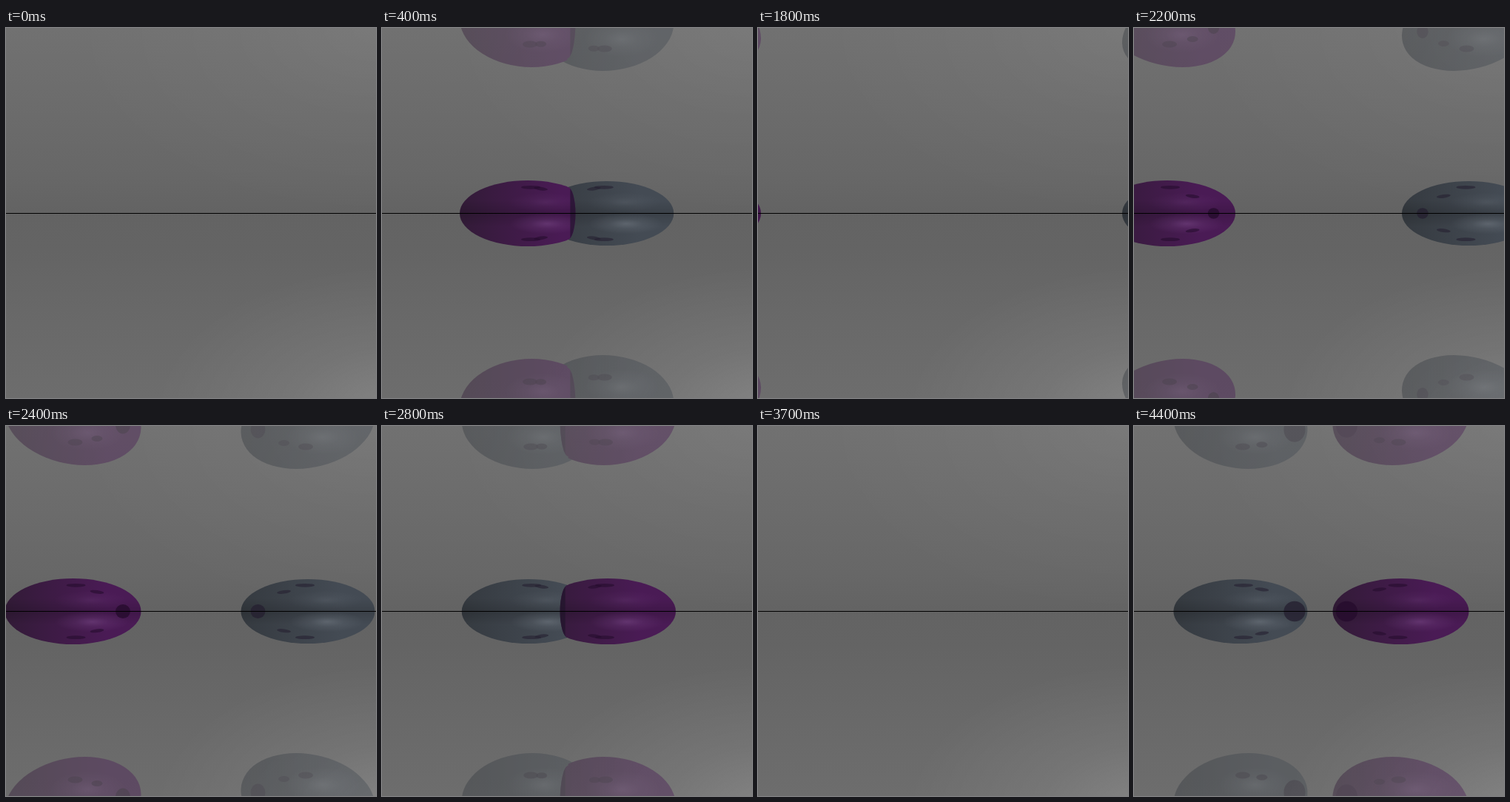
An HTML page with a canvas for the animation above (4.5 s loop, 500 px wide and 500 px high).

```html
<!DOCTYPE html>
<html>
<head>
<meta charset="utf-8">
<style>
html, body { margin: 0; width: 100%; height: 100%; overflow: hidden; background: #686868; }
canvas { display: block; width: 500px; height: 500px; }
</style>
</head>
<body>
<canvas id="stage" width="500" height="500"></canvas>
<script>
const STEP = 100, COUNT = 45, MID = 251, SIZE = 500;
const ctx = document.getElementById('stage').getContext('2d');

// The poses swing there and back, but play in alphabetical order: 0, 1, 10, 11 ...
const order = Array.from({ length: COUNT }, (_, i) => i).sort();

// Distance from the middle, by steps away from the crossing
const swing = [0, 54, 109.5, 160.5, 206, 248, 284, 314, 339, 358, 370, 374];

const purple = { rx: 92, ry: 44.5, mirrorY: -9, mirrorRy: 62,
  dark: '#321b37', light: '#4a1b55', spot: '#260c2d', shine: '130,80,145' };
const grey = { rx: 90.5, ry: 43.5, mirrorY: -3, mirrorRy: 61,
  dark: '#353a40', light: '#444b54', spot: '#262131', shine: '125,133,142' };

function layer(paint) {
  const c = document.createElement('canvas');
  c.width = c.height = SIZE;
  const g = c.getContext('2d');
  if (paint) paint(g);
  return g;
}

function glow(g, x, y, rx, ry, rgb, alpha) {
  g.save();
  g.translate(x, y);
  g.scale(rx, ry);
  const fill = g.createRadialGradient(0, 0, 0, 0, 0, 1);
  fill.addColorStop(0, `rgba(${rgb},${alpha})`);
  fill.addColorStop(0.45, `rgba(${rgb},${alpha * 0.38})`);
  fill.addColorStop(1, `rgba(${rgb},0)`);
  g.fillStyle = fill;
  g.fillRect(-1, -1, 2, 2);
  g.restore();
}

function oval(g, x, y, rx, ry, tilt = 0) {
  g.beginPath();
  g.ellipse(x, y, rx, ry, tilt, 0, 7);
  g.fill();
}

const room = layer(g => {
  const wall = g.createLinearGradient(0, 0, 0, SIZE);
  [[0, 113], [0.2, 108], [0.4, 103], [0.5, 99], [0.6, 100], [0.8, 105], [1, 109]]
    .forEach(([p, v]) => wall.addColorStop(p, `rgb(${v},${v},${v})`));
  g.fillStyle = wall;
  g.fillRect(0, 0, SIZE, SIZE);
  glow(g, 500, 0, 420, 260, '255,255,255', 0.06);
  glow(g, 530, 520, 330, 200, '255,255,255', 0.16);
}).canvas;

const mirror = layer();

// gap: distance between the centres, side: direction of the other ball
function ball(g, b, x, gap, side, mirrored) {
  const y = mirrored ? b.mirrorY : 250.5;
  const ry = mirrored ? b.mirrorRy : b.ry;
  const lean = mirrored ? (MID - x) * 0.1 : 0;
  g.save();
  g.translate(x, y);
  g.save();
  g.transform(1, 0, lean / ry, 1, 0, 0);
  g.beginPath();
  g.ellipse(0, 0, Math.sqrt(b.rx ** 2 - lean ** 2), ry, 0, 0, 7);
  g.restore();
  g.clip();

  const body = g.createLinearGradient(-b.rx, 0, b.rx, 0);
  body.addColorStop(0, b.dark);
  body.addColorStop(0.75, b.light);
  body.addColorStop(1, b.light);
  g.fillStyle = body;
  g.fillRect(-110, -80, 220, 160);

  if (mirrored) {
    glow(g, 20, 18, 50, 24, b.shine, 0.5);
  } else {
    const band = g.createLinearGradient(0, -18, 0, 18);
    band.addColorStop(0, 'rgba(0,0,0,0)');
    band.addColorStop(0.5, 'rgba(0,0,0,.14)');
    band.addColorStop(1, 'rgba(0,0,0,0)');
    g.fillStyle = band;
    g.fillRect(-110, -18, 220, 36);
    glow(g, 24, -15, 50, 13, b.shine, 0.2);
    glow(g, 26, 14, 50, 14, b.shine, 0.48);
  }

  const near = Math.max(gap, 60);
  g.fillStyle = b.spot;
  g.globalAlpha = 0.8;
  if (gap > 150) {
    const r = 3150 / near;
    oval(g, side * (58 + (490 - gap) * 0.055), mirrored ? 8 : 0, r, mirrored ? r * 1.15 : r * 0.95);
  }
  g.globalAlpha = 0.6;
  const ax = side * (40 - 2400 / near);
  if (mirrored) {
    oval(g, side * 3, 31, 10, 4.5);
    oval(g, ax, 33 - gap * 0.022, 7.5, 4);
  } else {
    for (const v of [-1, 1]) {
      oval(g, side * 4, v * 35.2, 13, 2.4);
      oval(g, ax, v * (37 - gap * 0.034), 9.5, 2.3, -v * side * 0.13);
    }
  }
  g.restore();
}

function pair(g, d, mirrored) {
  const px = MID + d, gx = MID - d * 0.978;
  const gap = Math.abs(px - gx), side = d < 0 ? 1 : -1;
  ball(g, grey, gx, gap, -side, mirrored);

  const depth = 16, reach = Math.hypot(gap, depth);
  const touching = reach < 2 * purple.rx;
  g.save();
  if (touching) {
    // The purple ball is a little nearer, so the seam bulges towards the grey one
    const seam = Math.sqrt(purple.rx ** 2 - reach ** 2 / 4);
    const mx = (px + gx) / 2, bulge = seam * depth / reach;
    const y = mirrored ? purple.mirrorY : 250.5;
    const h = seam * (mirrored ? purple.mirrorRy : purple.ry) / purple.rx;
    g.beginPath();
    g.rect(side < 0 ? mx : mx - SIZE, -100, SIZE, 700);
    g.ellipse(mx, y, bulge, h, 0, 0, Math.PI * 2);
    g.clip();
    ball(g, purple, px, gap, side, mirrored);
    if (gap > 60) {
      g.beginPath();
      g.ellipse(mx + side * 4, y, bulge - 3, h, 0, Math.PI / 2, Math.PI * 1.5, side > 0);
      g.fillStyle = 'rgba(32,20,42,.65)';
      g.fill();
    }
  } else {
    ball(g, purple, px, gap, side, mirrored);
  }
  g.restore();
}

function draw(pose) {
  const v = Math.abs(pose - 22) - 11;
  const d = Math.sign(v) * swing[Math.abs(v)];
  ctx.drawImage(room, 0, 0);

  mirror.clearRect(0, 0, SIZE, SIZE);
  pair(mirror, d, true);
  ctx.save();
  ctx.globalAlpha = 0.4;
  ctx.drawImage(mirror.canvas, 0, 0);
  ctx.translate(0, SIZE);
  ctx.scale(1, -1);
  ctx.drawImage(mirror.canvas, 0, 0);
  ctx.restore();

  pair(ctx, d, false);
  ctx.fillStyle = '#000';
  ctx.fillRect(0, 250, SIZE, 1);
}

const start = performance.now();
let shown = -1;
function tick(now) {
  const i = Math.floor(Math.max(0, now - start) / STEP) % COUNT;
  if (i !== shown) draw(order[shown = i]);
  requestAnimationFrame(tick);
}
tick(start);
</script>
</body>
</html>
```
